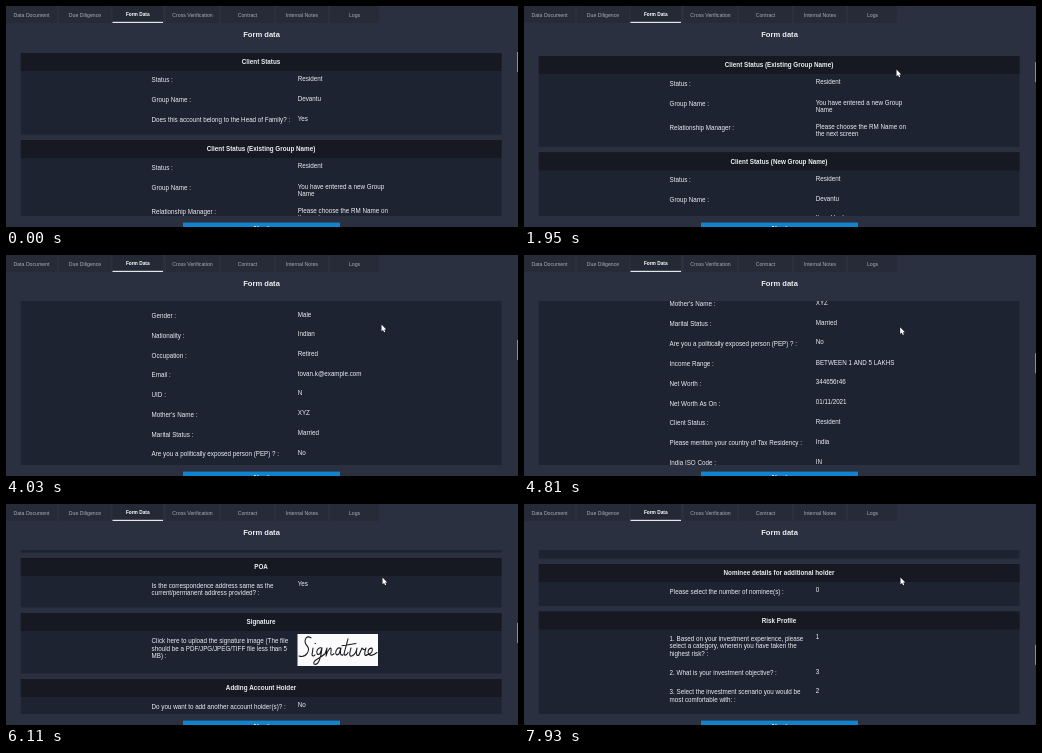
An HTML page with a canvas that plays this animation: 512 px wide and 221 px high, repeating every 8000 ms.

```html
<!DOCTYPE html>
<html lang="en">
<head>
<meta charset="utf-8">
<title>Form data</title>
<style>
  html, body { margin: 0; width: 100%; height: 100%; overflow: hidden; background: #2b3040; }
  canvas { display: block; width: 512px; height: 221px; }
</style>
</head>
<body>
<canvas id="stage" width="512" height="221"></canvas>
<script>
const ctx = document.getElementById('stage').getContext('2d');
const LOOP = 8000, STEP = 130;
const VIEW = { top: 46, bottom: 210, left: 14.6, right: 495.7 };
const LINE = 7.4;
const FONT = '"Liberation Sans", Arial, sans-serif';

const tabs = [
  ['Data Document', 0, 51], ['Due Diligence', 53, 105], ['Form Data', 106.5, 157],
  ['Cross Verification', 160, 213], ['Contract', 215, 268],
  ['Internal Notes', 270, 322], ['Logs', 324, 373]
];

// Each section: title, centre of its header, rows of [y, label, value].
const sections = [
  ['Client Status', 56, [
    [74, 'Status :', 'Resident'],
    [94, 'Group Name :', 'Devantu'],
    [114, 'Does this account belong to the Head of Family? :', 'Yes']]],
  ['Client Status (Existing Group Name)', 143, [
    [161.5, 'Status :', 'Resident'],
    [182, 'Group Name :', 'You have entered a new Group\nName'],
    [206, 'Relationship Manager :', 'Please choose the RM Name on\nthe next screen']]],
  ['Client Status (New Group Name)', 239.3, [
    [258, 'Status :', 'Resident'],
    [278, 'Group Name :', 'Devantu'],
    [297.5, 'Relationship Manager :', 'Ilena Vardo']]],
  ['Personal Details', 326.5, [
    [345.5, 'Salutation :', 'Mr.'],
    [365, 'Name :', 'TOMILVASHEN'],
    [385, 'Gender :', 'Male'],
    [404.5, 'Nationality :', 'Indian'],
    [424.5, 'Occupation :', 'Retired'],
    [444, 'Email :', 'tovan.k@example.com'],
    [463.5, 'UID :', 'N'],
    [483.5, "Mother's Name :", 'XYZ'],
    [503.5, 'Marital Status :', 'Married'],
    [523, 'Are you a politically exposed person (PEP) ? :', 'No'],
    [543.5, 'Income Range :', 'BETWEEN 1 AND 5 LAKHS'],
    [563, 'Net Worth :', '344656r46'],
    [583, 'Net Worth As On :', '01/11/2021'],
    [602.5, 'Client Status :', 'Resident'],
    [622.5, 'Please mention your country of Tax Residency :', 'India'],
    [642.5, 'India ISO Code :', 'IN']]],
  ['POA', 671, [
    [689.5, 'Is the correspondence address same as the\ncurrent/permanent address provided? :', 'Yes']]],
  ['Signature', 726, [
    [745, 'Click here to upload the signature image (The file\nshould be a PDF/JPG/JPEG/TIFF file less than 5\nMB) :', '']]],
  ['Adding Account Holder', 792, [
    [810.5, 'Do you want to add another account holder(s)? :', 'No'],
    [829.5, 'Single :', 'Single']]],
  ['Nominee details for additional holder', 859, [
    [877.5, 'Please select the number of nominee(s) :', '0']]],
  ['Risk Profile', 906.5, [
    [924.5, '1. Based on your investment experience, please\nselect a category, wherein you have taken the\nhighest risk? :', '1'],
    [959, '2. What is your investment objective? :', '3'],
    [978, '3. Select the investment scenario you would be\nmost comfortable with: :', '2']]]
];
const CONTENT_END = 1015;

const scrollKeys = [
  [1040, 0], [1950, 84], [2340, 84], [2860, 195], [3250, 195], [4030, 324],
  [5200, 490], [5590, 490], [6110, 608], [6630, 608], [7020, 697], [7410, 790]
];
const cursorXKeys = [[130, 268], [910, 372.5], [2860, 372.5], [4030, 375.5], [5200, 376.5]];
const cursorYKeys = [[130, 224], [910, 63.5], [1950, 63.5], [2860, 66.5], [4030, 69.5], [5200, 73.5]];

const signature = new Path2D(
  'M13 2C8-1 5 5 9 9C13 13 8 20 1 18 M15 11L14 17q1 2 3 0M17 7l.6 0' +
  'M24 11C18 9 17 19 22 16L24 11C23 20 20 27 16 25C14 22 22 20 27 16' +
  'L29 11L28 18C30 12 34 8 33 14q-1 5 3 2M42 11C37 10 36 20 41 16L43 11q-2 7 2 6' +
  'M50 3L46 16q1 3 4-1M44 9L58 7M53 11q-3 8 1 7q4-2 5-7q-2 8 2 6' +
  'L64 11q3 3 4 0q-3 8 1 6q7-2 5-6q-4 0-4 4q2 5 9 0');
const arrow = new Path2D('M0 0V8L1.8 6.4L3.1 9.2L4.4 8.6L3.2 5.9H5.6Z');

function track(keys, t) {
  if (t <= keys[0][0]) return keys[0][1];
  for (let i = 1; i < keys.length; i++) {
    const [t0, a] = keys[i - 1], [t1, b] = keys[i];
    if (t <= t1) return a + (b - a) * (t - t0) / (t1 - t0);
  }
  return keys[keys.length - 1][1];
}

function box(color, x0, y0, x1, y1) {
  ctx.fillStyle = color;
  ctx.fillRect(x0, y0, x1 - x0, y1 - y0);
}

function text(str, x, y, size, { color = '#eceef2', align = 'left', bold = false } = {}) {
  ctx.font = `${bold ? 'bold ' : ''}${size}px ${FONT}`;
  ctx.fillStyle = color;
  ctx.textAlign = align;
  str.split('\n').forEach((line, i) => ctx.fillText(line, x, y + size * 0.36 + i * LINE));
}

function drawTabs() {
  for (const [name, x0, x1] of tabs) {
    const active = name === 'Form Data';
    const style = { color: active ? '#ffffff' : '#a8acb5', align: 'center', bold: active };
    box(active ? '#242936' : '#272b38', x0, 0, x1, 17);
    text(name, (x0 + x1) / 2, active ? 8.5 : 9, active ? 4.8 : 5.2, style);
    if (active) box('#e4e6ea', x0, 15.8, x1, 17);
  }
}

function drawSignature() {
  box('#fbfbfb', 291.5, 738, 372, 770);
  ctx.save();
  ctx.translate(292, 739.5);
  ctx.scale(1, 1.14);
  ctx.strokeStyle = '#1b1b1f';
  ctx.lineWidth = 1.05;
  ctx.lineCap = ctx.lineJoin = 'round';
  ctx.stroke(signature);
  ctx.restore();
}

function drawForm(scroll) {
  ctx.save();
  ctx.beginPath();
  ctx.rect(VIEW.left, VIEW.top, VIEW.right - VIEW.left, VIEW.bottom - VIEW.top);
  ctx.clip();
  ctx.translate(0, -scroll);
  sections.forEach(([title, y, rows], i) => {
    const end = i + 1 < sections.length ? sections[i + 1][1] - 14.5 : CONTENT_END;
    box('#1e2331', VIEW.left, y - 9, VIEW.right, end);
    box('#161922', VIEW.left, y - 9, VIEW.right, y + 9);
    text(title, 255, y, 6.3, { align: 'center', bold: true });
    for (const [rowY, label, value] of rows) {
      text(label, 145.6, rowY, 6.28);
      text(value, 291.7, rowY - 1.4, 6.28);
    }
  });
  drawSignature();
  ctx.restore();
}

function drawCursor(x, y) {
  ctx.save();
  ctx.translate(x, y);
  ctx.scale(0.85, 0.85);
  ctx.lineWidth = 1;
  ctx.strokeStyle = '#11131a';
  ctx.stroke(arrow);
  ctx.fillStyle = '#ffffff';
  ctx.fill(arrow);
  ctx.restore();
}

function draw(t) {
  const scroll = track(scrollKeys, t);
  box('#2b3040', 0, 0, 512, 221);
  drawTabs();
  text('Form data', 255.5, 28, 7.6, { align: 'center', bold: true });
  drawForm(scroll);
  const thumb = VIEW.top + scroll * 0.12;
  box('#8a8f9a', 511, thumb, 512, thumb + 20);
  box('#1184cd', 177, 216.6, 334, 221);
  text('Next', 255.5, 222, 7.2, { color: '#ffffff', align: 'center', bold: true });
  drawCursor(track(cursorXKeys, t), track(cursorYKeys, t));
}

const start = performance.now();
function tick() {
  const t = (performance.now() - start) % LOOP;
  draw(Math.floor(t / STEP) * STEP);
  requestAnimationFrame(tick);
}
tick();
</script>
</body>
</html>
```
